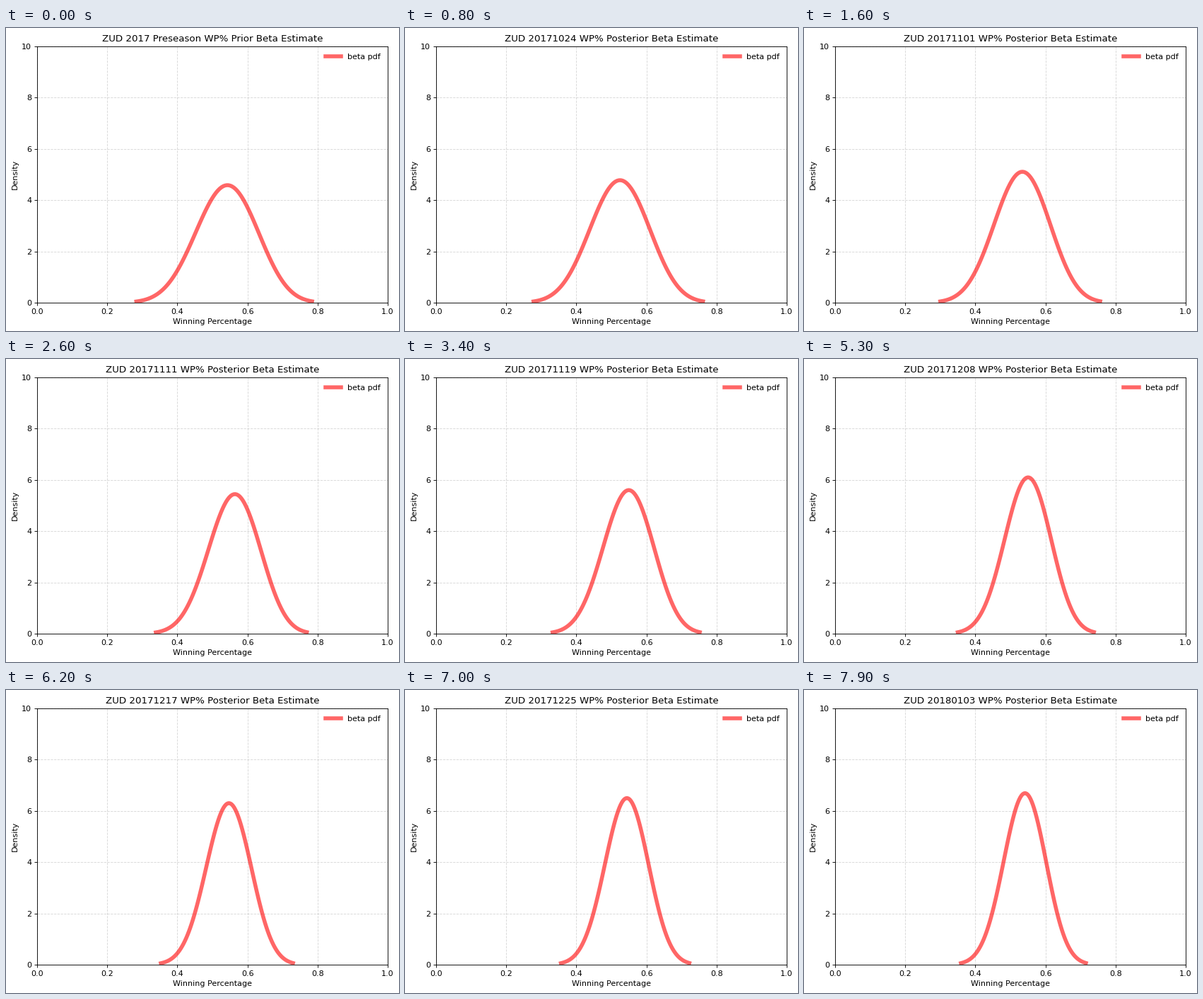
Write a matplotlib script that moves like this. It is 556 px wide and 428 px high and loops after 8 s.

```python
from math import lgamma

import matplotlib.pyplot as plt
import numpy as np
from matplotlib.animation import FuncAnimation

W, H, DPI = 556, 428, 80
DAYS = 80
TEAM = "ZUD"
START = np.datetime64("2017-10-16")

# Prior strength, then the days (after START) of each win and loss
PRIOR_A, PRIOR_B = 17.95, 15.27
WINS = np.array([5, 11, 13, 16, 18, 22, 24, 26, 32, 35,
                 39, 45, 47, 53, 57, 60, 67, 68, 71, 79])
LOSSES = np.array([2, 7, 9, 14, 19, 28, 34, 37, 43,
                   49, 51, 55, 58, 63, 65, 72, 75])

GRID = np.linspace(0.0005, 0.9995, 4000)


def beta_pdf(x, a, b):
    log_norm = lgamma(a + b) - lgamma(a) - lgamma(b)
    return np.exp(log_norm + (a - 1) * np.log(x) + (b - 1) * np.log(1 - x))


def beta_curve(a, b, tail=0.001):
    cdf = np.cumsum(beta_pdf(GRID, a, b))
    lo, hi = np.interp([tail, 1 - tail], cdf / cdf[-1], GRID)
    x = np.linspace(lo, hi, 100)
    return x, beta_pdf(x, a, b)


def title_text(day):
    if day == 0:
        return f"{TEAM} 2017 Preseason WP% Prior Beta Estimate"
    date = str(START + day).replace("-", "")
    return f"{TEAM} {date} WP% Posterior Beta Estimate"


plt.rcParams["font.family"] = "DejaVu Sans"
fig = plt.figure(figsize=(W / DPI, H / DPI), dpi=DPI, facecolor="white")
ax = fig.add_axes([44 / W, 40 / H, 496 / W, 362.4 / H])
ax.set_xlim(0, 1)
ax.set_ylim(0, 10)
ax.set_xlabel("Winning Percentage")
ax.set_ylabel("Density")
ax.grid(True, linestyle="--", color="#b0b0b0", alpha=0.5)
title = ax.set_title("")
line, = ax.plot([], [], "r-", lw=5, alpha=0.6, label="beta pdf")
ax.legend(loc="upper right", frameon=False)


def update(day):
    a = PRIOR_A + np.sum(WINS <= day)
    b = PRIOR_B + np.sum(LOSSES <= day)
    line.set_data(*beta_curve(a, b))
    title.set_text(title_text(day))
    return line, title


anim = FuncAnimation(fig, update, frames=DAYS, interval=100,
                     repeat=True, repeat_delay=0, blit=False)
plt.show()
```
